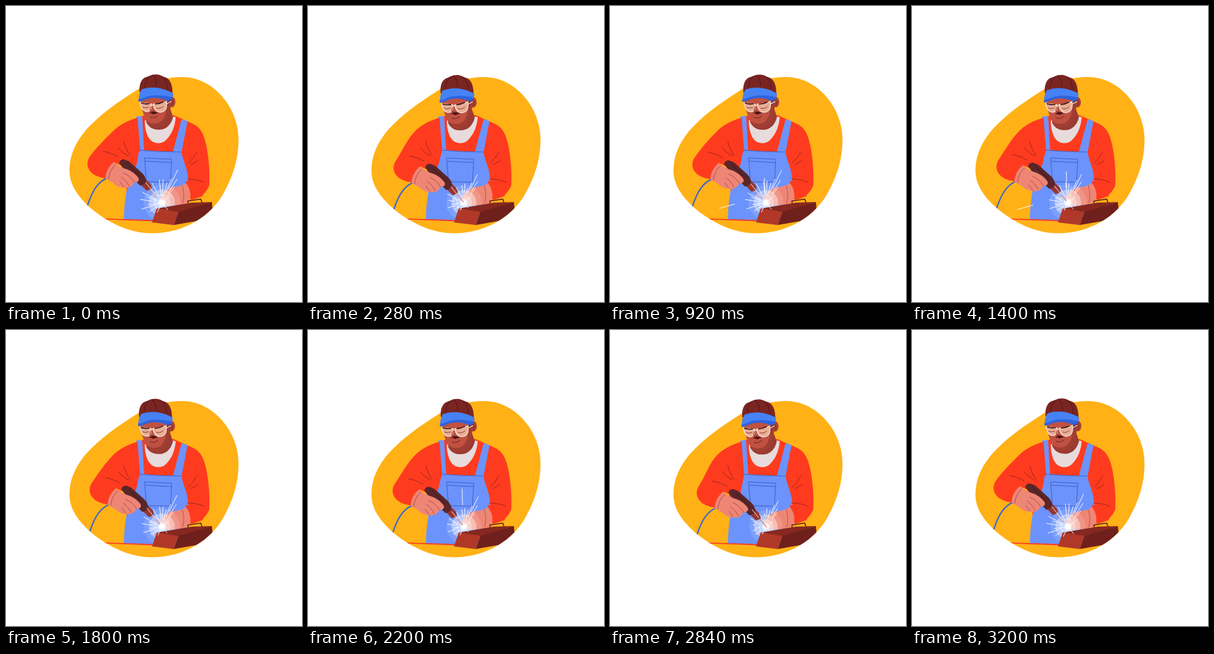
Animation, 450 px wide and 450 px high, one loop 3240 ms. Source, as an HTML page:

```html
<!DOCTYPE html>
<html lang="en">
<head>
<meta charset="utf-8">
<title>Welder</title>
<style>
html,body{margin:0;width:100%;height:100%;overflow:hidden;background:#fff}
svg{display:block;width:100vw;height:100vh}
.line{fill:none;stroke-linecap:round;stroke-linejoin:round}
</style>
</head>
<body>
<svg viewBox="0 0 450 450">
  <defs>
    <path id="blob" d="M96.5 248C97 226 106 207 122 188C142 166 168 147 200 127C226 112 248 108 268 108C296 108 320 124 336 147C348 165 354 185 353.5 206C353 232 346 258 330 286C312 318 272 345.5 222 345.5C186 345.5 150 327 124 303C104 283 96 267 96.5 248Z"/>
    <clipPath id="inside"><use href="#blob"/></clipPath>
  </defs>
  <use href="#blob" fill="#ffb116"/>

  <!-- torso -->
  <path fill="#ff3b1f" d="M208 167C188 173 172 183 164 191L180 235L184 290H276L282 294C294 293 304 285 309 273C310 258 309 236 305 214C301 196 297 185 284 179L255 166Z"/>
  <path fill="#e7dbdc" d="M211 174C211 189 215 200 221 205C227 210 238 210 244 203C252 195 257 183 258 169L240 165Z"/>
  <path fill="#6c93fb" d="M198 168L207 167L210 219C226 221 241 221 254 221L267 172L276 175L267 222C269 238 278 247 277 271L262 330L179 325C180 300 182 285 186 270C194 251 202 239 201 219Z"/>
  <path class="line" stroke="#3556b5" stroke-width=".8" d="M201 219Q232 222 266 222M211 231L252 233L250 268L214 267ZM212 236L251 238"/>
  <path class="line" stroke="#8d1f22" stroke-width=".8" d="M290 222Q285 232 277 239M292 235Q286 239 281 241M276 263Q290 263 301 268"/>

  <!-- head -->
  <g id="head">
    <path fill="#9b3b32" d="M246 145L254 169C250 184 240 189 231 188C222 188 216 183 213 176Z"/>
    <ellipse cx="252" cy="146" rx="5.5" ry="8" fill="#a84236"/>
    <path class="line" stroke="#74251f" stroke-width=".9" d="M251 143Q256 144 252 151"/>
    <path fill="#c05141" d="M204 138L249 137C250 157 248 170 240 177C232 184 220 182 215 177C210 171 206 157 204 138Z"/>
    <path fill="#a13e33" d="M245 144L251 145C250 168 243 181 231 184C222 186 215 181 213 174C221 180 231 180 237 174C244 166 244 156 245 144Z"/>
    <path fill="#7a2522" d="M245 139L253 137L250 146Q246 149 245 154Z"/>
    <path fill="#e9ad95" stroke="#f5dfcf" stroke-width="1.3" d="M204 147Q211 148 221 149Q222 160 214 160.5Q206 160 204 147ZM224 149Q235 149 244 145Q246 160 235 161.5Q225 161 224 149Z"/>
    <path class="line" stroke="#f5dfcf" stroke-width="1.3" d="M221 151Q223 150 224 151M244 149L251 145"/>
    <path class="line" stroke="#3b1517" stroke-width="1.6" d="M206 147.5Q212 149.5 218 148.5M227 149Q233 149 239 146"/>
    <path class="line" stroke="#7f3028" stroke-width=".9" d="M208 154Q212 156 217 154M229 155Q234 157 239 153"/>
    <path class="line" stroke="#8a3229" stroke-width="1" d="M221 153Q218 158 220 160L224 160"/>
    <path fill="#4a1518" d="M218 164C220 160 227 159 231 163C228 163 226 164 224 165C222 163 220 163 218 164Z"/>
    <path class="line" stroke="#7a2522" stroke-width="1" d="M219 169Q225 172 231 167"/>
    <path fill="#7a2522" d="M203 131C202 119 206 110 213 108C218 107 220 104 228 104C235 104 237 107 241 108C249 110 254 119 253 136Z"/>
    <path class="line" stroke="#551519" stroke-width="1" d="M211 123Q211 112 219 107M229 122Q230 112 223 105M245 126Q245 114 237 107"/>
    <path fill="#2f63dd" d="M201 145L203 134L206 127C220 122 237 123 254 133L253 141L247 145C238 140 229 139 221 140C212 141 207 146 201 145Z"/>
    <path fill="#4682f4" d="M202 141L203 134L206 127C220 122 237 123 254 133L253 139C243 136 232 135 222 136C212 137 207 142 202 141Z"/>
  </g>

  <g clip-path="url(#inside)">
    <!-- right glove, glow, box -->
    <path fill="#ff3b1f" d="M273 266L281 295L299 289L303 270Z"/>
    <path fill="#ee8676" d="M274 270C280 277 282 288 279 298C269 302 257 304 243 303C235 302 232 296 236 288C241 279 249 276 257 275C263 275 267 272 274 270Z"/>
    <path class="line" stroke="#b3524a" stroke-width=".9" d="M268 273Q272 285 269 299"/>
    <g id="glow" fill="#fff">
      <circle r="28" opacity=".12"/>
      <circle r="20" opacity=".38"/>
      <circle r="13" opacity=".3"/>
      <circle r="7" opacity=".4"/>
      <circle r="4.6"/>
    </g>
    <path fill="#ff3b1f" d="M148 323L230 325.5V327.5L148 324.5Z"/>
    <path class="line" stroke="#6c1f1b" stroke-width="1.6" d="M277 302L276.5 296.5L296 293.5L298 299"/>
    <path fill="#86281f" d="M229 308L282 299L313 298L262 314Z"/>
    <path fill="#6f201c" d="M262 313L313 298L314 309L295 326L255 333Z"/>
    <path fill="#b03828" d="M229 308L262 313L255 333L222 329Z"/>

    <!-- working arm -->
    <path id="sleeve" fill="#ff3b1f"/>
    <path class="line" stroke="#8d1f22" stroke-width=".8" d="M179 206Q182 219 189 227M171 216Q178 224 186 228"/>
    <g id="hand">
      <path class="line" stroke="#8d1f22" stroke-width=".8" d="M148 221Q160 223 170 229"/>
      <path class="line" stroke="#3a62d2" stroke-width="2" d="M155 261C139 267 131 282 124 303L118 322"/>
      <path class="line" stroke="#d9948a" stroke-width="1.6" d="M217 276L230 291"/>
      <path fill="#97352f" d="M212 263L220 271Q222 275 221 278L214 281L205 272Z"/>
      <path fill="#5a2629" d="M172 239Q173 233 179 233L187 236L207 254Q213 260 213 267Q210 272 204 273L184 254Z"/>
      <path class="line" stroke="#3a141a" stroke-width=".9" d="M183 239L204 259"/>
      <path fill="#ee8676" d="M164 237C170 243 174 244 180 247C188 249 196 254 201 261C204 266 199 269 195 268C193 274 187 278 180 276C173 277 167 273 163 269L151 262Q152 247 164 237Z"/>
      <path class="line" stroke="#a8484a" stroke-width=".9" d="M167 241Q157 249 156 263M179 254Q189 258 195 268M175 260Q183 265 187 274M173 267L179 275"/>
    </g>
    <path id="sparks" class="line" stroke="#fff" stroke-width=".9"/>
  </g>
</svg>
<script>
const LOOP = 3240, SWAY = LOOP / 4, SHOTS = LOOP / 2, STEP = 40, TAU = Math.PI * 2;
const CENTER = [237, 299];
const $ = id => document.getElementById(id);

// Ray tips relative to the weld point
const rays = [
  [-30, -16], [-33, -5], [-31, 10], [-19, 14], [-7, 15], [-25, -31],
  [-15, -30], [-4, -35], [2, -36], [8, -31], [-23, -9], [-21, 3], [9, 11], [14, -11]
];
const dashes = [[25, -52], [24, -37], [15, -38], [20, -25]];
// Long sparks: direction, offset, start times within the cycle
const shots = [
  { dir: [-.03, -1], from: [-1, 0], starts: [530, 897, 1364] },
  { dir: [-.965, .26], from: [-2, -10], starts: [852, 1324] }
];
const SHOT_SPEED = .75;

const at = (v, k) => (CENTER[0] + v[0] * k).toFixed(1) + ' ' + (CENTER[1] + v[1] * k).toFixed(1);
const segment = (v, a, b) => 'M' + at(v, a) + 'L' + at(v, b);

function sparkPath(t, sway) {
  const wave = (n, i) => Math.sin(TAU * n * t / LOOP + i * 2.4);
  let d = '';
  rays.forEach((v, i) => {
    const reach = .98 - .28 * sway + .14 * sway * wave(13 + i % 5, i);
    d += segment(v, .3 + .15 * sway, reach);
  });
  dashes.forEach((v, i) => {
    const reach = .96 - .16 * sway + .08 * sway * wave(11 + i, i);
    d += segment(v, Math.max(.4, reach - .55 + .2 * sway), reach);
  });
  for (const { dir, from, starts } of shots) {
    for (const start of starts) {
      const head = 20 + SHOT_SPEED * (t % SHOTS - start);
      if (head < 20 || head > 84) continue;
      const point = k => at([from[0] + dir[0] * k, from[1] + dir[1] * k], 1);
      d += 'M' + point(Math.max(12, head - 24)) + 'L' + point(head);
    }
  }
  return d;
}

function sleevePath(d) {
  const p = (x, y) => `${(x + d).toFixed(2)} ${(y + d).toFixed(2)}`;
  return `M200 170C184 174 171 182 163 190C151 202 ${p(136, 216)} ${p(126, 231)}` +
    `Q${p(121, 241)} ${p(127, 250)}Q${p(134, 260)} ${p(152, 262)}` +
    `Q${p(153, 247)} ${p(165, 238)}L${p(174, 242)}L${p(190, 241)}L204 220Z`;
}

function draw(t) {
  const sway = (1 - Math.cos(TAU * t / SWAY)) / 2;
  const slide = 8 * sway;
  $('sleeve').setAttribute('d', sleevePath(slide));
  $('hand').setAttribute('transform', `translate(${slide} ${slide * 1.08})`);
  $('head').setAttribute('transform', `translate(0 ${sway}) rotate(${-2 * sway} 238 182)`);
  const size = 1 - .07 * sway + .05 * Math.sin(TAU * 17 * t / LOOP);
  $('glow').setAttribute('transform', `translate(${CENTER}) scale(${size})`);
  $('sparks').setAttribute('d', sparkPath(t, sway));
}

const origin = performance.now();
function frame(now) {
  const t = Math.max(0, now - origin) % LOOP;
  draw(Math.floor(t / STEP) * STEP);
  requestAnimationFrame(frame);
}
draw(0);
requestAnimationFrame(frame);
</script>
</body>
</html>
```
